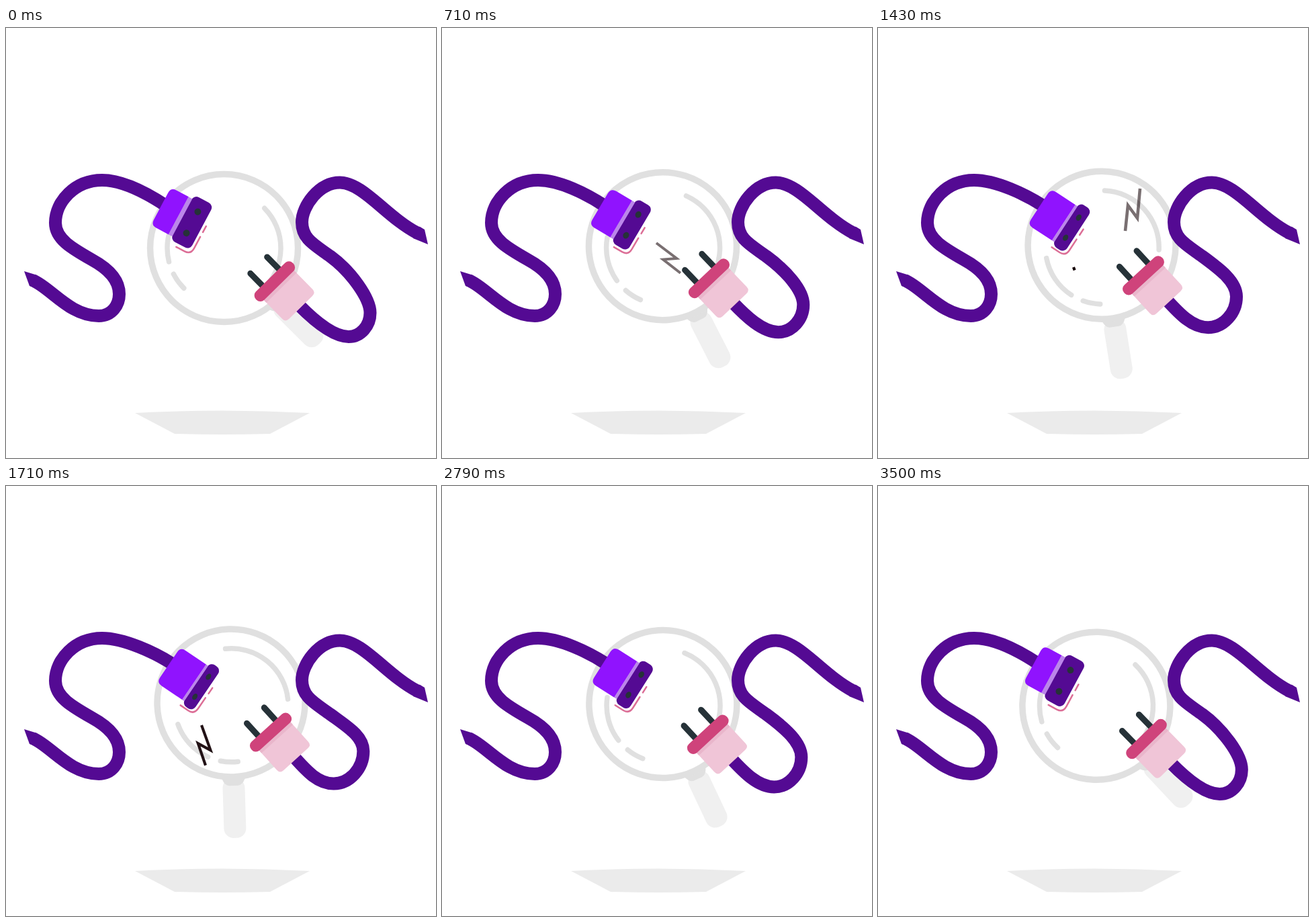
An HTML page that plays this animation: 640 by 640 pixels, repeating every 3.57 s.

```html
<!DOCTYPE html>
<html lang="en">
<head>
<meta charset="utf-8">
<title>Unplugged</title>
<style>
html, body { margin: 0; width: 100%; height: 100%; overflow: hidden; background: #fff; }
svg { display: block; width: 100vw; height: 100vh; }
.line { fill: none; }
.cable { fill: none; stroke: #540a93; stroke-width: 19; }
.tip { fill: #540a93; }
.lens { fill: none; stroke: #e0e0e0; stroke-linecap: round; }
.bolt { fill: none; stroke: #150408; stroke-width: 4.6; stroke-linejoin: miter; stroke-miterlimit: 5; }
</style>
</head>
<body>
<svg viewBox="0 0 640 640">
  <path fill="#ebebeb" d="M192 573Q322 566 452 573L393 604Q322 606 251 604Z"/>

  <g id="glass">
    <rect x="-16.5" y="112" width="33" height="89" rx="14.5" fill="#f0f0f0"/>
    <path fill="#e0e0e0" d="M-17 108H17V113Q13 123 6 123H-6Q-13 123 -17 113Z"/>
    <circle class="lens" r="110" stroke-width="9.5"/>
  </g>
  <g id="shine" class="lens" stroke-width="7.5"></g>

  <path id="cableL" class="cable"/>
  <path class="tip" d="M27 362L45 367.5L37 384.5L35 384Z"/>
  <path id="cableR" class="cable"/>
  <path class="tip" d="M615.6 295.5L623 300L628 322L606 313Z"/>

  <g id="socket">
    <g id="cap">
      <rect id="face" y="-40" height="75.5" rx="8" fill="#540a93"/>
      <ellipse class="hole" cy="-20.3" ry="5" fill="#263238"/>
      <ellipse class="hole" cy="15.6" ry="5" fill="#263238"/>
    </g>
    <path id="body" fill="#9013fe"/>
    <rect id="band" y="-33.5" height="63.5" fill="#bb86ea"/>
    <path id="trim" class="line" stroke="#dc6e96" stroke-width="2.5" stroke-linecap="round"
      d="M12 41H26Q36.5 41 36.5 30V11M36.8 3V-7"/>
  </g>

  <g id="plug">
    <path class="line" stroke="#263238" stroke-width="9" stroke-linecap="round" d="M-33.5 -17.4H-4M-33.5 17.4H-4"/>
    <path fill="#f0c5d7" d="M6 -32H48Q55 -32 55 -25V24Q55 31 48 31H6Z"/>
    <path fill="#e9b6cb" d="M6 -32H14V31H6Z"/>
    <rect x="-8.5" y="-38.5" width="17.5" height="77" rx="8" fill="#cf437b"/>
  </g>

  <g id="bolts"></g>
</svg>
<script>
const LOOP = 3570, STEPS = 50;
const $ = id => document.getElementById(id);
const set = (el, attrs) => { for (const k in attrs) el.setAttribute(k, attrs[k]); };
const rad = deg => deg * Math.PI / 180;
const mix = (a, b, u) => a + (b - a) * u;
const clamp = x => Math.max(0, Math.min(1, x));

function add(parent, attrs) {
  const el = document.createElementNS("http://www.w3.org/2000/svg", "path");
  set(el, attrs);
  parent.append(el);
  return el;
}

// Reach of the two plugs towards each other: [step, amount]
const REACH = [[0, 0], [25, 0.98], [28, 1], [32, 0.95], [39, 0.66], [50, 0]];
function reach(k) {
  const i = REACH.findIndex(p => p[0] > k);
  const [k0, v0] = REACH[i - 1], [k1, v1] = REACH[i];
  return mix(v0, v1, (k - k0) / (k1 - k0));
}

// Lens reflections: clockwise angles from the top
for (const [from, to] of [[45.5, 135.5], [225, 242.7], [256, 302]]) {
  const at = deg => `${84.5 * Math.sin(rad(deg))} ${-84.5 * Math.cos(rad(deg))}`;
  add($("shine"), { d: `M${at(from)}A84.5 84.5 0 0 1 ${at(to)}` });
}

const BOLTS = [
  { start: 4.5, place: "translate(319 320) rotate(-58) scale(.86)" },
  { start: 14.5, place: "translate(390 239)" },
  { start: 19.8, place: "translate(291 356) rotate(-25) scale(.9)" }
];
for (const b of BOLTS) {
  b.el = add($("bolts"), {
    class: "bolt", d: "M0 0L-4 44L-18 25L-22 63", transform: b.place,
    pathLength: 100, "stroke-dasharray": "0 200"
  });
}

// A posed part: its transform and a mapping from its own coordinates to the stage
function pose(x, y, deg) {
  const c = Math.cos(rad(deg)), s = Math.sin(rad(deg));
  return {
    transform: `translate(${x} ${y}) rotate(${deg})`,
    at: (a, b) => [x + a * c - b * s, y + a * s + b * c],
    dir: [c, s]
  };
}

function drawGlass(k) {
  const m = k <= 25 ? k : STEPS - k;
  set($("glass"), { transform: `translate(335.5 338.5) rotate(${1.8 * m - 45}) translate(0 -15.5)` });
  set($("shine"), { transform: `translate(${324.5 + 0.46 * m} ${327.5 - 0.05 * m}) rotate(${-2.15 * m})` });
}

function drawSocket(u) {
  const p = pose(262 + 9.8 * u, 284 + 4.3 * u, 28 + 6.6 * u);
  const left = -7 + 17.3 * u, wide = 6.5 - 2.8 * u, edge = left + wide;
  const mid = (edge + 32) / 2;
  set($("socket"), { transform: p.transform });
  set($("face"), { x: edge - 0.5, width: 32.5 - edge });
  document.querySelectorAll(".hole").forEach(h => set(h, { cx: mid, rx: 5 - 1.6 * u }));
  set($("body"), { d: `M-27.5 -33.5H${left + 0.5}V30H-27.5Q-36.5 30 -36.5 21V-24.5Q-36.5 -33.5 -27.5 -33.5Z` });
  set($("band"), { x: left, width: wide });
  set($("trim"), { transform: `translate(0 ${-3 * u})` });

  const [x, y] = p.at(-30, -6);
  set($("cableL"), {
    d: "M40 375.5C68 388 95 428.5 138 428.5C158 428.5 168.5 412 168.5 396" +
       "C168.5 374 150 357 128 345C98 328 73.5 314 73.5 290" +
       `C73.5 258 103 226.5 143 226.5C175 226.5 ${x - 28} ${y - 18.5} ${x} ${y}`
  });
}

function drawPlug(u) {
  const p = pose(399.7 - 6.2 * u, 377 - 11.3 * u, 45.5 + 2.5 * u);
  set($("plug"), { transform: p.transform });

  const [x, y] = p.at(50, -1), [dx, dy] = p.dir;
  const bx = mix(510, 486.3, u), by = mix(459.5, 442, u);
  const rx = mix(542, 531.2, u), ry = mix(424, 393, u);
  set($("cableR"), {
    d: `M${x} ${y}C${x + 28 * dx} ${y + 28 * dy} ${bx - 24} ${by} ${bx} ${by}` +
       `C${bx + mix(18, 24, u)} ${by} ${rx} ${ry + mix(19, 26, u)} ${rx} ${ry}` +
       `C${rx} ${ry - 22} ${mix(513, 509, u)} ${mix(362, 359, u)} 483 340` +
       "C459 322.5 440.5 314 440.5 289C440.5 265 466 230 497 230" +
       "C531 230 566 281 612 305"
  });
}

function drawBolts(k) {
  for (const { el, start } of BOLTS) {
    const drawn = clamp((k - start) / 4), fade = clamp((k - start - 4) / 3.5);
    set(el, {
      "stroke-dasharray": drawn < 1 ? `${drawn * 100} 200` : "none",
      opacity: drawn > 0 ? 1 - fade : 0
    });
  }
}

function draw(ms) {
  const k = Math.min(STEPS - 1, Math.floor((ms % LOOP + 5) / (LOOP / STEPS)));
  const u = reach(k);
  drawGlass(k);
  drawSocket(u);
  drawPlug(u);
  drawBolts(k);
}

const t0 = performance.now();
function tick() {
  draw(performance.now() - t0);
  requestAnimationFrame(tick);
}
tick();
</script>
</body>
</html>
```
